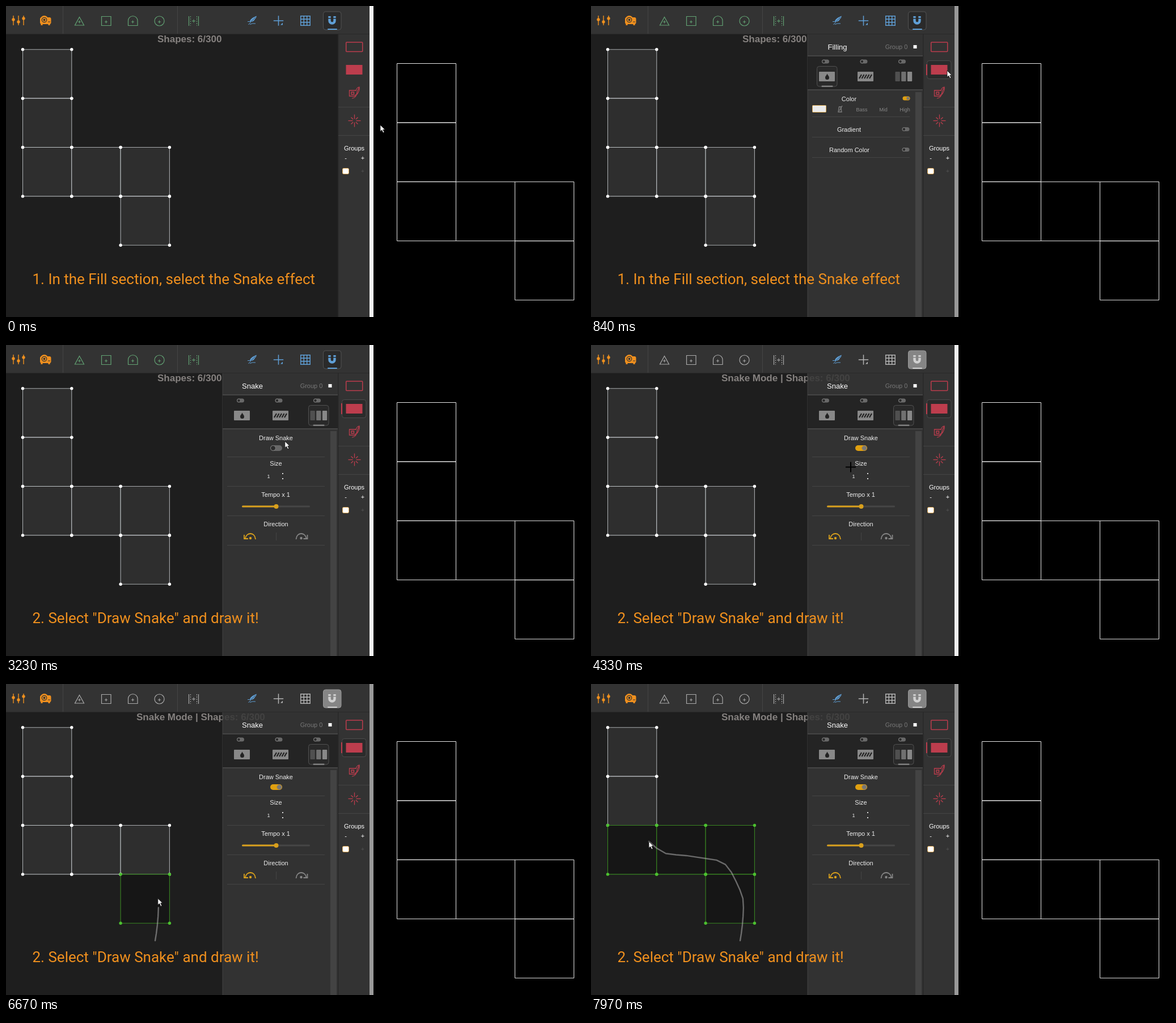
An HTML page with a canvas that plays this animation: 1021 by 549 pixels, repeating every 8 s.

```html
<!DOCTYPE html>
<html lang="en">
<head>
<meta charset="utf-8">
<title>Snake effect tutorial</title>
<style>
html, body { margin: 0; width: 100%; height: 100%; overflow: hidden; background: #000; }
canvas { display: block; }
</style>
</head>
<body>
<canvas id="stage" width="1021" height="549"></canvas>
<script>
const c = document.getElementById('stage').getContext('2d');
const LOOP = 8000;
const SANS = '"Liberation Sans", Arial, sans-serif';
const ORANGE = '#f0901e', GOLD = '#d9a01c', GREEN = '#62a273', BLUE = '#5f9fd6', RED = '#bd3d4d', LINE = '#444';

// ---------- drawing helpers ----------
function box(x, y, w, h, fill, stroke, r = 0, lw = 1) {
  c.beginPath();
  c.roundRect(x, y, w, h, r);
  if (fill) { c.fillStyle = fill; c.fill(); }
  if (stroke) { c.strokeStyle = stroke; c.lineWidth = lw; c.stroke(); }
}
function path(d, stroke, lw = 1, fill) {
  const p = new Path2D(d);
  if (fill) { c.fillStyle = fill; c.fill(p); }
  if (stroke) { c.strokeStyle = stroke; c.lineWidth = lw; c.stroke(p); }
}
function at(x, y, draw) {
  c.save(); c.translate(x, y); draw(); c.restore();
}
function dot(x, y, r, fill, stroke, lw = 1) {
  box(x - r, y - r, 2 * r, 2 * r, fill, stroke, r, lw);
}
function text(s, x, y, size, color = '#eee', align = 'center', font = SANS, weight = 400) {
  c.font = `${weight} ${size}px ${font}`;
  c.textAlign = align;
  c.fillStyle = color;
  c.fillText(s, x, y);
}
const rule = (x, y, w) => box(x, y, w, 1, LINE);
const plus = (x, y, color, r = 2.5, lw = 1) => path(`M${x - r} ${y}h${2 * r}M${x} ${y - r}v${2 * r}`, color, lw);
function toggle(x, y, on, w = 13, h = 7) {
  box(x - w / 2, y - h / 2, w, h, on ? '#e0a010' : '#686868', null, h / 2);
  dot(x + (on ? 1 : -1) * (w - h) / 2, y, h / 2 - .6, on ? '#777' : '#2c2c2c', on ? '#c09030' : '#808080');
}

// ---------- motion ----------
const TICK = 103;
const smooth = k => k * k * (3 - 2 * k);
const easeIn = k => k * k;
const easeOut = k => k * (2 - k);

const moves = [
  { start: 110, end: 840, to: [628, 114], ease: easeOut },
  { start: 1240, end: 1850, to: [560, 122], ease: smooth },
  { start: 2560, end: 3340, to: [482, 177], ease: smooth },
  { start: 3450, end: 3570, to: [482, 181], ease: smooth },
  { start: 4000, end: 4720, to: [386, 319], ease: easeIn },
  { start: 4820, end: 5570, to: [280, 459], ease: easeOut },
  { start: 5790, end: 5790, to: [273, 461], ease: smooth },
  { start: 6040, end: 6040, to: [266, 452], ease: smooth }
];
function pointerAt(t) {
  let [x, y] = [660, 210];
  for (const { start, end, to, ease } of moves) {
    if (t < start) break;
    const steps = Math.round((end - start) / TICK) + 1;
    const k = ease(Math.min(1, (Math.floor((t - start) / TICK + .1) + 1) / steps));
    x += (to[0] - x) * k;
    y += (to[1] - y) * k;
  }
  return [x, y];
}

// The hand-drawn line, sampled once per tick.
const DRAW_START = 6190, DRAW_TICK = 99, DRAW_STEPS = 17;
const curve = document.createElementNS('http://www.w3.org/2000/svg', 'path');
curve.setAttribute('d', 'M263 453Q269 420 269 383Q264 362 249 336Q240 311 209 309L162 302L140 301Q125 300 102 278');
const samples = Array.from({ length: DRAW_STEPS + 1 }, (_, i) => {
  const p = curve.getPointAtLength(curve.getTotalLength() * (i / DRAW_STEPS) ** 1.1);
  return [p.x, p.y];
});
const drawStep = t => Math.floor((t - DRAW_START) / DRAW_TICK + .15);

// ---------- shapes in both views ----------
const cells = [[0, 0], [0, 1], [0, 2], [1, 2], [2, 2], [2, 3]];
const gx = i => 29.5 + 86.3 * i;
const gy = j => 76.7 + 86.4 * j;

function editorCells(trail) {
  const visited = ([i, j]) => trail.some(([x, y]) => x > gx(i) && x < gx(i + 1) && y > gy(j) && y < gy(j + 1));
  const paint = (list, fill, edge, corner) => {
    for (const [i, j] of list) box(gx(i), gy(j), 86.3, 86.4, fill, edge, 0, 1.1);
    for (const [i, j] of list)
      for (const k of [0, 1, 2, 3]) dot(gx(i + (k & 1)), gy(j + (k >> 1)), 2.7, corner);
  };
  paint(cells.filter(p => !visited(p)), '#2e2e2e', 'rgba(235,240,245,.66)', '#fff');
  paint(cells.filter(visited), '#161616', '#398522', '#4cc030');
  if (trail.length > 1) {
    c.lineJoin = c.lineCap = 'round';
    path('M' + trail.join('L'), 'rgba(190,190,190,.5)', 2.4);
    c.lineJoin = 'miter'; c.lineCap = 'butt';
  }
}

function outputView() {
  box(648, 0, 373, 549, '#000');
  for (const [i, j] of cells) box(689.5 + 104 * i, 101.5 + 104.4 * j, 104, 104.4, null, '#e8e8e8');
}

// ---------- interface ----------
function toolbar(drawing) {
  const shape = drawing ? '#aaa' : GREEN, tool = drawing ? '#b4b4b4' : BLUE;
  box(0, 0, 641, 49, '#333');
  box(0, 49, 641, 1, '#292929');
  for (const x of [100, 302]) box(x, 0, 1, 49, '#454545');

  [24, 28, 22].forEach((y, i) => {
    path(`M${13 + 9 * i} 17V34`, ORANGE, 1.4);
    dot(13 + 9 * i, y, 2.7, ORANGE);
  });
  box(60, 20, 19.5, 12, ORANGE, null, 3);
  path('M63 31v3M76 31v3', ORANGE, 3);
  dot(67.5, 24, 7, ORANGE);
  dot(67.5, 24.5, 4.8, '#333');
  dot(67.5, 24.5, 2.8, null, ORANGE, 1.6);
  path('M74 28h4', '#333');

  path('M129.5 19.5L137.5 34H121.5Z', shape, 1.2);
  box(168.5, 18.5, 16.5, 16, null, shape, 0, 1.2);
  path('M215.5 34.5V26a8 8 0 0 1 16.5 0V34.5Z', shape, 1.2);
  dot(270.5, 26.5, 8.5, null, shape, 1.2);
  for (let i = 0; i < 4; i++) plus(129.5 + 47 * i, 28, shape);
  path('M322.5 18V35M339.5 18V35', shape, 1.2);
  c.setLineDash([2, 2]);
  path('M325.5 18V35M336.5 18V35', shape);
  c.setLineDash([]);
  plus(331, 26.5, shape, 3);

  path('M430 28C430 23 436 20 442 17.5C441 20 441 22 439 23C438 26 435 28 430 28Z', null, 0, BLUE);
  path('M426 27.5H431M427.5 33L438 21M430 32.5Q434 30 440 31', BLUE);
  path('M432 27.5L440 20', '#333', .8);
  plus(480.5, 26, tool, 8.7, 1.5);
  path('M484 33.5H488V29.5Z', null, 0, tool);
  box(519.7, 17.7, 16.5, 16.5, null, tool, 0, 1.4);
  path('M525.2 18V34M530.7 18V34M520 23.2H536M520 28.7H536', tool, 1.4);

  box(559.5, 10, 31.5, 32, drawing ? '#858585' : '#2a2a2a', drawing ? '#999' : '#525252', 4);
  const magnet = drawing ? '#d0d0d0' : BLUE;
  path('M570.5 22.5V26a4.5 4.5 0 0 0 9 0V22.5M570.5 18V21M579.5 18V21', magnet, 4.4);
  box(567, 40, 17, 2, magnet, null, 1);
}

function sidebar(fillActive) {
  box(586, 50, 55, 499, '#333');
  box(585, 50, 1.5, 499, '#282828');
  box(599.7, 64, 29, 16.5, null, RED, 1, 1.5);
  if (fillActive) {
    box(592.5, 96.5, 42.5, 32, '#2b2b2b', '#4c4c4c', 4);
    box(591, 103, 2, 19, RED);
  }
  box(599.5, 104, 29, 17, RED);
  path('M617 149H605.5V159H616V156', RED, 1.3);
  box(609, 152, 4.5, 4, null, RED, 0, 1.3);
  path('M610 163Q617 162 618 156T623 143M617 150Q618 144 623 143Q624 150 618 157', RED, 1.2);
  rule(586, 178, 55); rule(586, 228, 55);
  at(614.5, 202.5, () => {
    for (let i = 0; i < 8; i++) {
      path(i % 2 ? 'M3.5 0H8.5' : 'M3 0H11', RED, 1.3);
      c.rotate(Math.PI / 4);
    }
  });
  text('Groups', 614, 255, 11, '#fff');
  text('-', 599, 272, 11, '#fff');
  text('+', 629, 272, 11, '#fff');
  box(593.5, 286.5, 11, 10, '#fff', '#e0a850', 2);
  text('+', 629, 295, 10, '#555');
}

function turnArrow(x, flip, color) {
  at(x, 338, () => {
    c.scale(flip, 1);
    path('M-8 3C-6 -8 9 -8 10 5', color, 1.8);
    path('M-10 -3V4H-3', color, 1.8);
    dot(1, 3, 2.2, color);
  });
}

function colorPage() {
  text('Color', 455, 168, 11);
  toggle(556, 163, true);
  box(390.5, 175.5, 24, 12, '#ebebeb', '#d9a850', 1);
  path('M436 187L437.5 178H440.5L442 187ZM438 185L443 176', '#808080', 1.3);
  ['Bass', 'Mid', 'High'].forEach((name, i) => text(name, 477.5 + 38 * i, 186, 9, '#858585'));
  text('Gradient', 455, 222, 11);
  text('Random Color', 455.5, 258, 11);
  toggle(555, 217.5); toggle(555, 253.5);
  for (let i = 0; i < 3; i++) rule(390, 195 + 36 * i, 172);
}

function snakePage(drawing) {
  text('Draw Snake', 476, 168, 11);
  toggle(476.5, 182, drawing, 21, 10);
  text('Size', 476, 213, 11);
  text('1', 463, 235, 9);
  for (const y of [226, 235]) box(487, y, 2, 2, '#ddd');
  text('Tempo x 1', 475.5, 268, 11);
  box(416, 283.5, 120, 3, '#464646', null, 1.5);
  box(416, 283.5, 60, 3, GOLD, null, 1.5);
  dot(476.5, 285, 4, GOLD);
  text('Direction', 476, 320, 11);
  turnArrow(430, 1, GOLD);
  turnArrow(521.5, -1, '#858585');
  box(476, 331, 1, 14, LINE);
  for (let i = 0; i < 4; i++) rule(390, Math.round(196.5 + 52.3 * i), 172);
}

function panel(snake, drawing) {
  box(382, 50, 204, 499, 'rgba(54,54,54,.84)');
  box(381.5, 50, 1, 499, '#424242');
  text(snake ? 'Snake' : 'Filling', 434.5, 76.5, 13, '#fff');
  text('Group 0', 538.5, 76, 11, '#777');
  box(568.5, 69, 6, 6, '#fff');
  box(382, 87, 204, 62, '#454545');
  box(382, 89, 204, 58, '#242424');
  const tabX = snake ? 533.5 : 398.5;
  box(tabX, 106.5, 35.5, 35.5, '#292929', '#505050', 4);
  box(tabX + 8, 140.5, 20, 2.5, '#808080', null, 1);
  for (let i = 0; i < 3; i++) {
    toggle(413.5 + 67.5 * i, 98);
    if (i < 2) box(402 + 68 * i, 116, 28, 17, '#888', null, 1);
    box(536.5 + 10.7 * i, 116, 8.3, 17, ['#505050', '#707070', '#888'][i], null, 1);
  }
  path('M416.5 119.5C418 123 420 124 420 126.5a3.5 3.5 0 0 1 -7 0C413 124 415 123 416.5 119.5Z', null, 0, '#222');
  for (let x = 473; x < 493; x += 4.5) path(`M${x} 128L${x + 4} 121`, '#222', 2.2);
  box(572, 152, 11, 397, '#434343');
  if (snake) snakePage(drawing); else colorPage();
}

function pointer([x, y], cross) {
  if (cross) plus(x, y, '#000', 9, 2);
  else at(x, y, () => path('M0 0V11.5L2.7 9L5 13.8L7 12.8L4.8 8.2H8.3Z', '#111', .8, '#fff'));
}

function render(t) {
  const fillActive = t >= 525, panelOpen = t >= 735, snake = t >= 2250, drawing = t >= 4000;
  const splitterHot = t >= 315 && t < 2050 || t >= 6040;
  const step = Math.min(DRAW_STEPS + 1, drawStep(t));
  box(0, 0, 641, 549, '#1e1e1e');
  editorCells(samples.slice(0, Math.max(0, step)));
  text((drawing ? 'Snake Mode | ' : '') + 'Shapes: 6/300', drawing ? 230 : 267, 64, 17, '#85817f', 'left', SANS, 700);
  toolbar(drawing);
  if (panelOpen) panel(snake, drawing);
  sidebar(fillActive);
  box(641, 0, 7, 549, splitterHot ? '#999' : '#f0f0f0');
  outputView();
  text(t < 2890 ? '1. In the Fill section, select the Snake effect' : '2. Select "Draw Snake" and draw it!',
    46.5, 491, 26, ORANGE, 'left', 'Roboto, sans-serif');
  pointer(step < 0 ? pointerAt(t) : samples[Math.min(step, DRAW_STEPS)], t >= 4100 && t < 6040);
}

const begin = performance.now();
function frame() {
  render((performance.now() - begin) % LOOP);
  requestAnimationFrame(frame);
}
frame();
</script>
</body>
</html>
```
